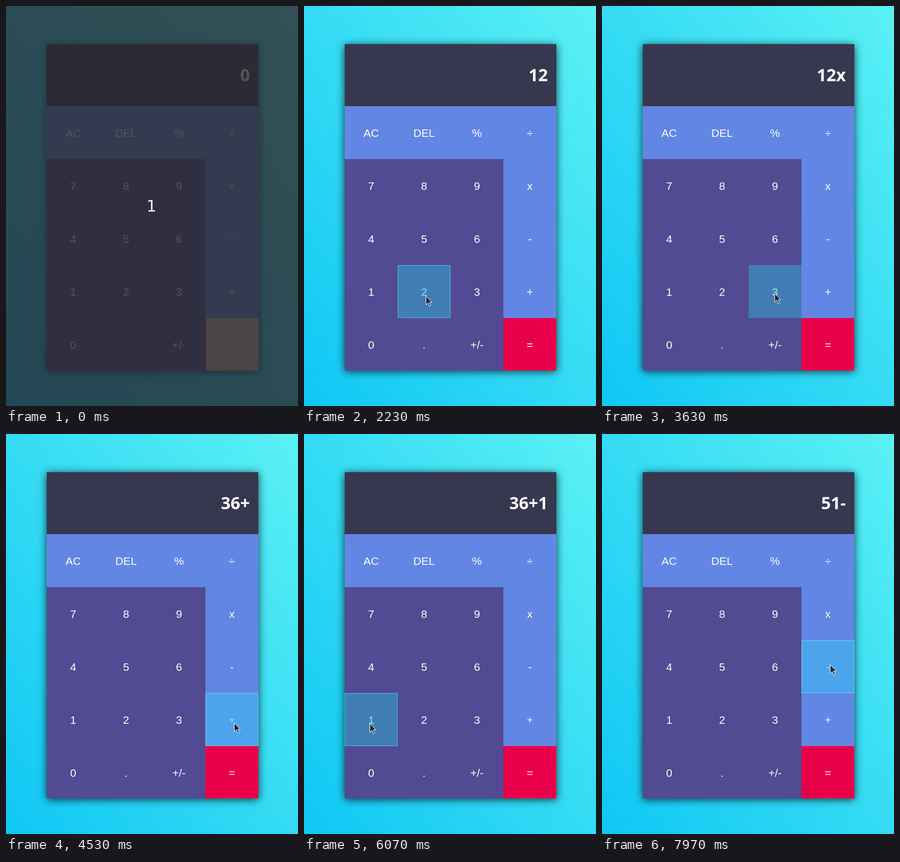
An HTML page for the animation above (8 s loop, 552x755 px).

```html
<!DOCTYPE html>
<html lang="en">
<head>
<meta charset="utf-8">
<title>Calculator</title>
<style>
  html, body { margin: 0; width: 100%; height: 100%; overflow: hidden; }
  body { position: relative; background: linear-gradient(to top right, #0fc7f4, #35dbf4 50%, #5bf1f4); }
  #shadow { position: absolute; left: 77px; top: 72px; width: 400px; height: 616px; box-shadow: 0 2px 15px rgba(0, 0, 0, .75); }
  svg { position: absolute; left: 0; top: 0; display: block; }
  .key { font: 20.8px "Liberation Sans", Arial, sans-serif; text-anchor: middle; }
  #screen { font: bold 32px "Open Sans", sans-serif; text-anchor: end; fill: #fff; }
  #count { font: 30px "DejaVu Sans", sans-serif; text-anchor: middle; fill: #f0f0f0; }
</style>
</head>
<body>
<div id="shadow"></div>
<svg width="552" height="755" viewBox="0 0 552 755">
  <rect x="77" y="72" width="400" height="117" fill="#373750"/>
  <text id="screen" x="461" y="142"></text>
  <g id="pad"></g>
  <rect id="ring" width="99" height="99" fill="none"/>
  <path id="cursor" d="M.5 .5V17L4.3 13.4 6.9 19.6 9.6 18.4 7.1 12.4H12Z" fill="#25252b" stroke="#fff" stroke-linejoin="round"/>
  <g id="intro">
    <rect width="552" height="755" fill="rgb(40,40,45)" opacity=".8"/>
    <rect x="378" y="589" width="99" height="99" fill="#4a4647"/>
    <text class="key" x="427" y="647" fill="#6b3f4c">=</text>
    <text id="count" x="275" y="388">1</text>
  </g>
</svg>
<script>
const LOOP = 8000, STEP = 10, FADE = 70;
const LABELS = ['AC', 'DEL', '%', '÷', '7', '8', '9', 'x', '4', '5', '6', '-', '1', '2', '3', '+', '0', '.', '+/-', '='];

// Cursor waypoints: time, x, y
const PATH = [
  [0, 379, 688], [500, 379, 688], [880, 123, 546], [1620, 123, 546],
  [2060, 230, 547], [2330, 230, 547], [2850, 430, 345], [3140, 430, 345],
  [3570, 326, 542], [3920, 326, 542], [4090, 431, 545], [4930, 431, 545],
  [5080, 374, 536], [5190, 278, 530], [5270, 265, 530], [5620, 124, 546],
  [6080, 124, 546], [6560, 203, 432], [6900, 203, 432], [7450, 431, 435], [LOOP, 431, 435]
];

// Clicks: time, key, screen text
const CLICKS = [
  [0, '', '0'], [1430, '1', '1'], [2150, '2', '12'], [3000, 'x', '12x'], [3770, '3', '12x3'],
  [4370, '+', '36+'], [5850, '1', '36+1'], [6700, '5', '36+15'], [7830, '-', '51-']
];

const $ = id => document.getElementById(id);
const mix = (a, b, p) => `rgb(${a.map((v, i) => Math.round(v + (b[i] - v) * p))})`;

function add(tag, attrs, parent) {
  const el = document.createElementNS('http://www.w3.org/2000/svg', tag);
  for (const name in attrs) el.setAttribute(name, attrs[name]);
  return parent.appendChild(el);
}

const keys = LABELS.map((label, i) => {
  const col = i % 4, row = Math.floor(i / 4);
  const x = 77 + col * 100, y = 189 + row * 100;
  const blue = row === 0 || col === 3;
  const box = { x, y, width: 100, height: row === 4 ? 99 : 100 };
  add('rect', { ...box, fill: label === '=' ? '#e80048' : blue ? '#6286e4' : '#524a92' }, $('pad'));
  const glow = add('rect', { ...box, fill: 'rgb(36,222,249)' }, $('pad'));
  const text = add('text', { class: 'key', x: x + 50, y: y + 58 }, $('pad'));
  text.textContent = label;
  return { label, x, y, blue, glow, text, levels: [] };
});

const held = (a, b) => a[1] === b[1] && a[2] === b[2];

function slope(i, axis) {
  const a = PATH[i - 1], p = PATH[i], b = PATH[i + 1];
  if (!a || !b || held(a, p) || held(p, b)) return 0;
  return (b[axis] - a[axis]) / (b[0] - a[0]);
}

function cursorAt(t) {
  let i = 0;
  while (i < PATH.length - 2 && t >= PATH[i + 1][0]) i++;
  const a = PATH[i], b = PATH[i + 1], span = b[0] - a[0], u = (t - a[0]) / span;
  return [1, 2].map(axis => {
    const ease = u * u * (3 - 2 * u);
    return a[axis] + (b[axis] - a[axis]) * ease
      + span * u * (1 - u) * ((1 - u) * slope(i, axis) - u * slope(i + 1, axis));
  });
}

// Hover strength of every key over the loop
for (let t = 0; t <= LOOP; t += STEP) {
  const [x, y] = cursorAt(t);
  for (const key of keys) {
    const over = x >= key.x && x < key.x + 100 && y >= key.y && y < Math.min(key.y + 100, 688);
    const last = key.levels.length ? key.levels[key.levels.length - 1] : 0;
    key.levels.push(last + (over - last) * (1 - Math.exp(-STEP / FADE)));
  }
}

function draw(t) {
  const [, pressed, value] = CLICKS.filter(c => c[0] <= t).pop();
  const intro = t < 100;
  const frame = Math.floor(t / STEP);
  $('screen').textContent = value;
  $('ring').style.display = pressed ? '' : 'none';

  for (const key of keys) {
    const level = key.levels[frame];
    key.glow.setAttribute('opacity', 0.35 * level);
    key.text.setAttribute('fill', mix([255, 255, 255], [122, 236, 241], level ** 3));
    if (key.label === pressed) {
      const ring = $('ring');
      ring.setAttribute('x', key.x + 0.5);
      ring.setAttribute('y', key.y + 0.5);
      ring.setAttribute('stroke', key.blue
        ? mix([72, 152, 238], [140, 212, 240], level)
        : mix([76, 120, 190], [80, 187, 220], level));
      ring.setAttribute('stroke-dasharray', key.blue ? '2 1' : 'none');
    }
  }

  const [x, y] = cursorAt(t);
  $('cursor').setAttribute('transform', `translate(${Math.round(x)} ${Math.round(y)})`);
  $('cursor').style.display = intro ? 'none' : '';
  $('intro').style.display = intro ? '' : 'none';
}

const start = performance.now();
function tick() {
  draw((performance.now() - start) % LOOP);
  requestAnimationFrame(tick);
}
tick();
</script>
</body>
</html>
```
